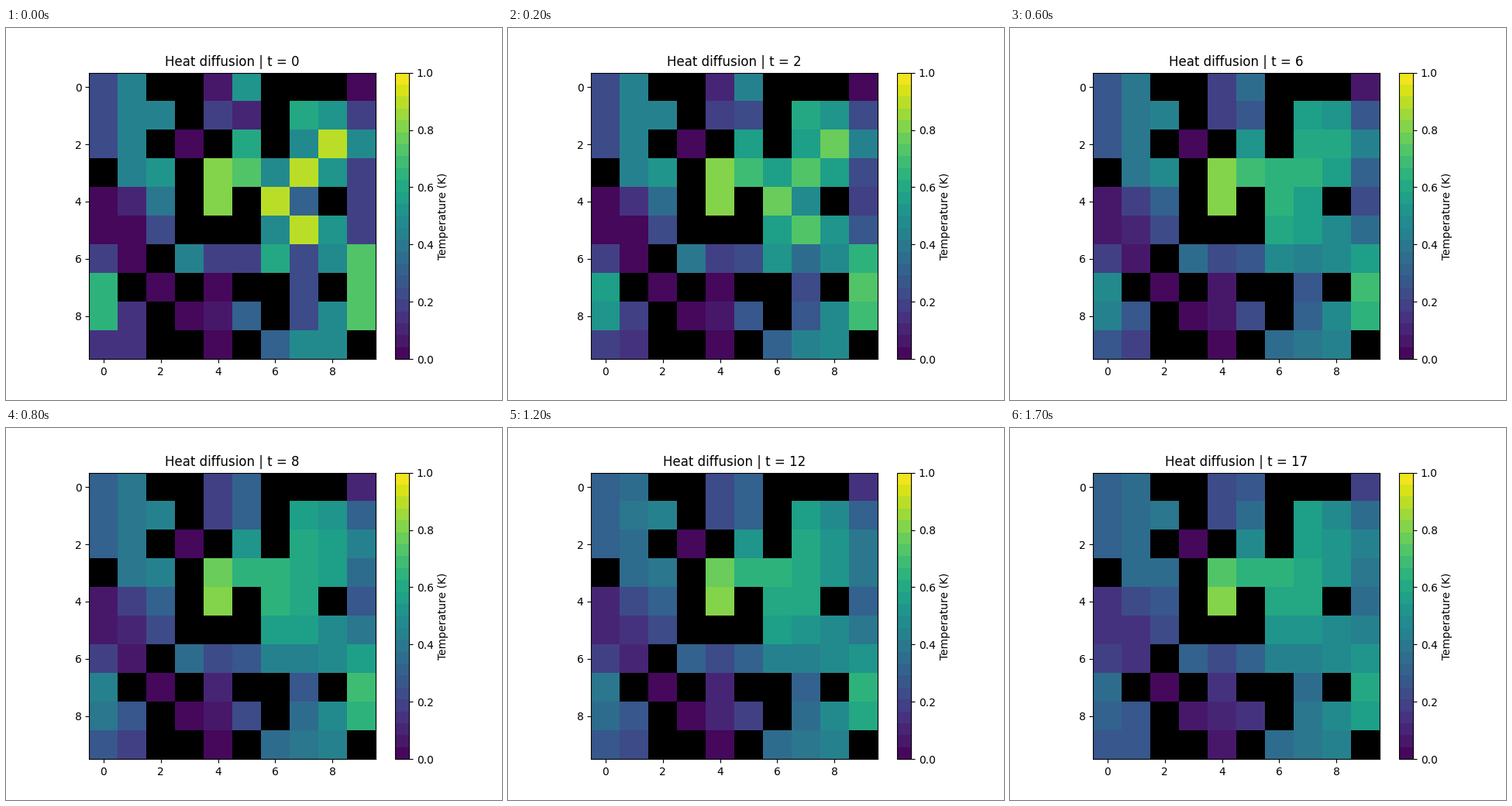
Animation of 640x480 px, one loop 1.8 s. Source, as a matplotlib script:

```python
import numpy as np
import matplotlib.pyplot as plt
from matplotlib.animation import FuncAnimation
from matplotlib.colors import ListedColormap

SIZE = 10
STEPS = 18
RATE = 0.055
BANDS = 24


def banded_viridis():
    """Viridis in equal flat bands, with black for walls."""
    centres = (np.arange(BANDS) + 0.5) / BANDS
    cmap = ListedColormap(plt.get_cmap("viridis")(centres))
    cmap.set_bad("black")
    return cmap


def start_field():
    """Cold plate with warm and hot regions painted over it."""
    u = np.zeros((SIZE, SIZE))

    # Upper left: two warm columns fading downwards
    u[:3, 0] = 0.225
    u[:4, 1:3] = 0.45
    u[3:6, 2] = np.linspace(0.54, 0.23, 3)
    u[4, 1] = 0.12

    # Lower left corner
    u[6, 0] = 0.2
    u[7:9, 0] = 0.63
    u[8:, 1] = u[9, 0] = 0.16

    # Middle: hot pocket and the corridor above it
    u[3:5, 4] = 0.83
    u[2:4, 5] = 0.59, 0.72
    u[:2, 5] = 0.5, 0.12
    u[:2, 4] = 0.06, 0.2
    u[6, 3:6] = 0.43, 0.2, 0.17
    u[8, 4:6] = 0.06, 0.3

    # Right: warm plain, cool channel and two-tone edge
    u[1:, 6:] = 0.46
    u[1::5, 7] = u[6, 6] = 0.62
    u[6:9, 7] = 0.22
    u[4, 7] = u[9, 6] = 0.3
    u[1:6, 9] = 0.18
    u[2, 9] = 0.46
    u[6:9, 9] = 0.72
    u[1:6, 8] = 0.53

    # Bent hot ridge
    rows = np.arange(2, 6)
    u[rows, 6 + abs(rows - 4)] = 0.91
    return u


def add_walls(u):
    walls = [(2, 3, 6, 7, 8), (3, 6), (2, 4, 6), (0, 3), (3, 5, 8),
             (3, 4, 5), (2,), (1, 3, 5, 6, 8), (2, 6), (2, 3, 5, 9)]
    for row, cols in enumerate(walls):
        u[row, list(cols)] = np.nan
    u[0, 9] = 0.02
    return u


def diffuse(u):
    """One explicit step; walls and borders carry no heat."""
    p = np.pad(u, 1, constant_values=np.nan)
    neighbours = (p[:-2, 1:-1], p[2:, 1:-1], p[1:-1, :-2], p[1:-1, 2:])
    return u + RATE * sum(np.nan_to_num(n - u) for n in neighbours)


states = [add_walls(start_field())]
for _ in range(STEPS - 1):
    states.append(diffuse(states[-1]))

fig, ax = plt.subplots(figsize=(6.4, 4.8), dpi=100)
image = ax.imshow(np.ma.masked_invalid(states[0]), cmap=banded_viridis(),
                  vmin=0, vmax=1)
fig.colorbar(image, label="Temperature (K)")
title = ax.set_title("Heat diffusion | t = 0")


def update(t):
    image.set_data(np.ma.masked_invalid(states[t]))
    title.set_text(f"Heat diffusion | t = {t}")
    return image, title


anim = FuncAnimation(fig, update, frames=STEPS, interval=1800 / STEPS, repeat=True)
plt.show()
```
